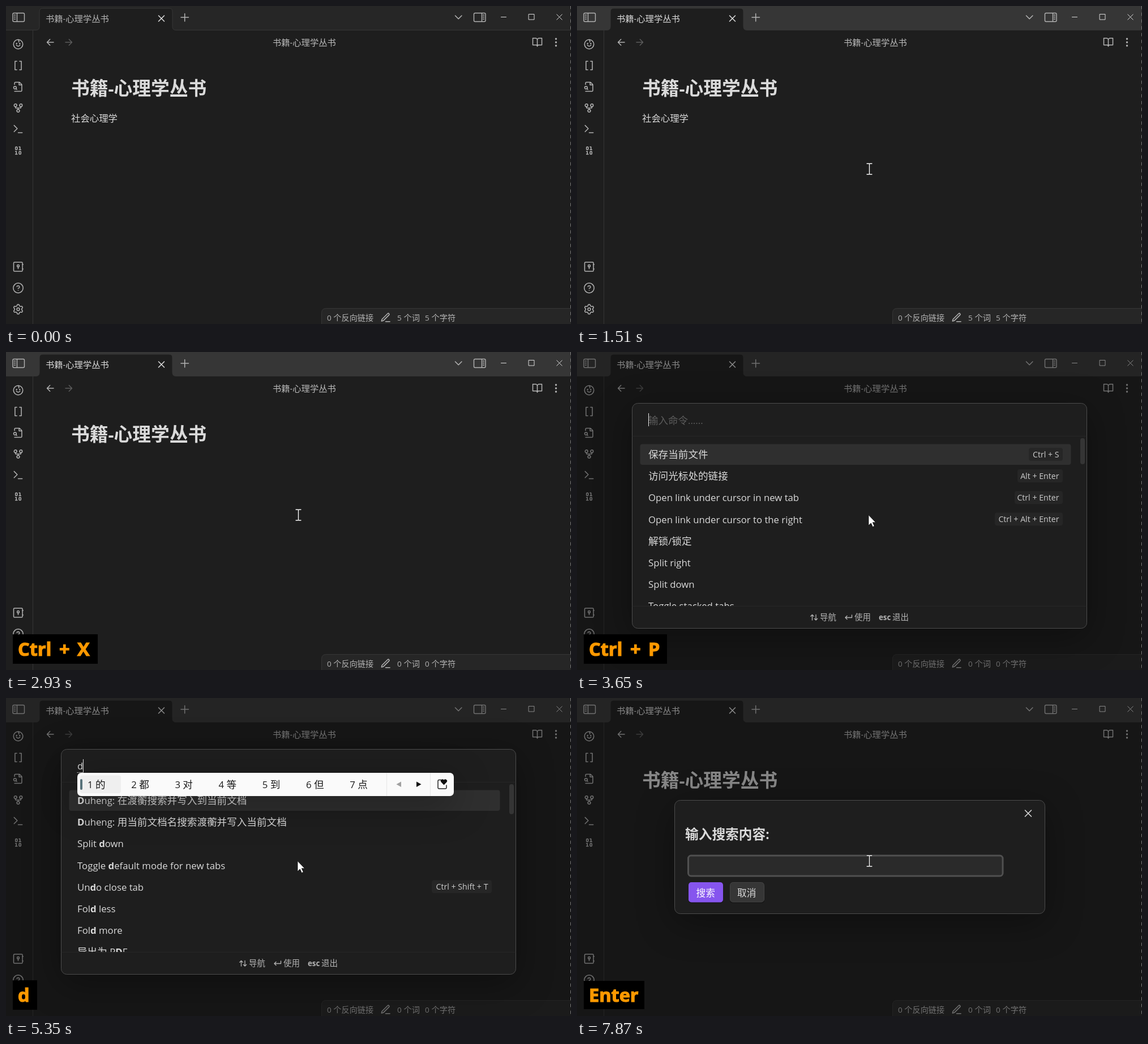
Recreate the animation shown at these times as an HTML page. Size 998 by 561 pixels, loop 8000 ms.

```html
<!DOCTYPE html>
<html lang="zh-CN">
<head>
<meta charset="utf-8">
<title>Command palette</title>
<style>
html, body { margin: 0; width: 100%; height: 100%; overflow: hidden; background: #1e1e1e; }
svg { display: block; width: 100vw; height: 100vh; }
text { font-family: "Open Sans", "Noto Sans CJK SC", "Noto Sans CJK", sans-serif; white-space: pre; }
.panel { filter: drop-shadow(0 15px 32px rgba(0, 0, 0, .35)); }
</style>
</head>
<body>
<svg id="stage" viewBox="0 0 998 561" xmlns="http://www.w3.org/2000/svg"></svg>
<script>
const LOOP = 8000;
const MUTED = '#b3b3b3', BRIGHT = '#dadada', LINE = '#363636', BASE = '#1e1e1e';
const LATIN = 0.952; // latin glyphs are set a little smaller than the CJK ones

const box = (x, y, w, h, fill, r = 0, more = '') =>
  `<rect x="${x}" y="${y}" width="${w}" height="${h}" rx="${r}" fill="${fill}" ${more}/>`;
const line = (d, color = MUTED, w = 1.5, more = '') =>
  `<path d="${d}" fill="none" stroke="${color}" stroke-width="${w}" stroke-linecap="round" stroke-linejoin="round" ${more}/>`;
const group = (id, body, more = '') => `<g id="${id}" ${more}>${body}</g>`;

// Asterisks switch bold on and off.
function runs(str, size) {
  return str.split('*').map((part, i) =>
    part.split(/([\u3000-\u9fff]+)/).filter(Boolean).map(run => {
      const px = /[\u3000-\u9fff]/.test(run) ? size : size * LATIN;
      return `<tspan font-size="${px.toFixed(2)}"${i % 2 ? ' font-weight="700"' : ''}>${run}</tspan>`;
    }).join('')).join('');
}
const text = (x, y, size, fill, str, more = '') =>
  `<text x="${x}" y="${y}" fill="${fill}" ${more}>${runs(str, size)}</text>`;

// Icons live on a 24-unit grid centred at (x, y).
const icon = (x, y, d, extra = '', s = 0.8) =>
  `<g transform="translate(${x} ${y}) scale(${s}) translate(-12 -12)" fill="none" stroke="${MUTED}"
    stroke-width="1.9" stroke-linecap="round" stroke-linejoin="round"><path d="${d}"/>${extra}</g>`;
const ring = (x, y, r) => `<circle cx="${x}" cy="${y}" r="${r}"/>`;
const frame = (x, y, w, h, r) => `<rect x="${x}" y="${y}" width="${w}" height="${h}" rx="${r}"/>`;
const cross = (x, y, r, color, w) =>
  line(`M${x - r} ${y - r}l${2 * r} ${2 * r}m0 ${-2 * r}l${-2 * r} ${2 * r}`, color, w);

function gear() {
  let d = '';
  for (let i = 0; i < 96; i++) {
    const a = i / 96 * 2 * Math.PI;
    const r = 9.2 + 1.5 * Math.tanh(1.8 * Math.cos(6 * a));
    d += `${i ? 'L' : 'M'}${(12 + r * Math.sin(a)).toFixed(2)} ${(12 - r * Math.cos(a)).toFixed(2)}`;
  }
  return d + 'Z';
}

function sidePanel(x, divider, tick) {
  return line(`M${x + 2} 12.500h16.500q2 0 2 2v11q0 2-2 2h-16.500q-2 0-2-2v-11q0-2 2-2M${divider} 12.500v15` +
    `M${tick} 16h2m-2 3.500h2m-2 3.500h2`, MUTED, 1.4);
}

const ribbon = () => [
  icon(21.500, 67.500, 'M8 14q4 4.500 8 0M12 2.500q3 2 1 4.500', ring(12, 12, 10.300) +
    `<g fill="${MUTED}">${ring(8.500, 10.500, .7)}${ring(15.500, 10.500, .7)}</g>`),
  icon(21.500, 105, 'M9 2.500H5v19h4M15 2.500h4v19h-4'),
  icon(21.500, 142.500, 'M4 22h14a2 2 0 0 0 2-2V7l-5-5H6a2 2 0 0 0-2 2v3M14 2v6h6M9 18l-1.500-1.500', ring(5, 14, 3)),
  icon(21.500, 180, 'M18 9v2q0 1-1 1H7q-1 0-1-1V9M12 12v3', ring(12, 18, 3) + ring(6, 6, 3) + ring(18, 6, 3)),
  icon(21.500, 217, 'M3 18l7-7-7-7M12 20h9'),
  icon(21.500, 255, 'M6 20h4M14 10h4M6 14h2v6M14 4h2v6', frame(14, 14, 4, 6, 1.500) + frame(6, 4, 4, 6, 1.500)),
  icon(21.500, 460, 'M12 12.500v4M21.500 7h1.500M21.500 17h1.500', frame(2, 2, 19.500, 20, 2) + ring(12, 10, 2.300)),
  icon(21.500, 497.500, 'M9.100 9a3 3 0 0 1 5.800 1c0 2-3 3-3 3M12 17h.01', ring(12, 12, 10.800)),
  icon(21.500, 535, gear(), ring(12, 12, 3))
].join('');

const TAB = 'M-2 42.500H53q6 0 6-6V10q0-6 6-6H288q6 0 6 6V36.500q0 6 6 6H1000';
const NAME = '书籍-心理学丛书';

const app = () =>
  box(0, 0, 998, 561, BASE) +
  box(0, 0, 998, 42, '#262626', 0, 'id="bar"') +
  `<path d="${TAB}V46H-2Z" fill="${BASE}"/>` + line(TAB, LINE, 1) +
  line('M47.500 43V561', LINE, 1) +
  sidePanel(12, 19.500, 14.500) + sidePanel(826.500, 840.500, 842.500) +
  text(70, 28, 15.300, MUTED, NAME, 'id="tabName"') +
  cross(274.500, 22, 5, BRIGHT, 1.6) +
  line('M309 20h13.500M315.700 13.500v13.500', MUTED, 1.5) +
  line('M793.500 17l5.700 5.700 5.700-5.700', MUTED, 1.6) +
  line('M874.500 19.500h9M923.500 14.500h9.500v9.500h-9.500z', BRIGHT, 1) + cross(977.500, 19.500, 4.700, BRIGHT, 1) +
  line('M84 64H72.500m5.200-5.200L72.500 64l5.200 5.200', MUTED) +
  line('M105 64h11.500m-5.200-5.200l5.200 5.200-5.200 5.200', '#5c5c5c') +
  text(471, 69.500, 15.300, '#b8b8b8', NAME) +
  icon(938.500, 64, 'M12 7v14M2 18V3h6a4 4 0 0 1 4 4 4 4 0 0 1 4-4h6v15h-7a3 3 0 0 0-3 3 3 3 0 0 0-3-3z') +
  [58, 64, 70].map(y => `<circle cx="971.500" cy="${y}" r="1.700" fill="${MUTED}"/>`).join('') +
  ribbon() +
  text(115, 157, 32.750, BRIGHT, NAME, 'font-weight="700"') +
  box(115, 185, 82, 22, '#423265', 0, 'id="selection"') +
  text(115, 203.500, 16.400, BRIGHT, '社会心理学', 'id="body"') +
  `<path d="M557.500 562V541.500q0-8 8-8H1000V562Z" fill="#262626" stroke="${LINE}"/>` +
  text(567, 555, 14.200, MUTED, '0 个反向链接') +
  icon(670.500, 549.500, 'M12 21h9.500M16.500 3.500a2.100 2.100 0 0 1 3 3L7 19l-4 1 1-4z') +
  text(691, 555, 14.200, MUTED, '5', 'id="words"') + text(702.500, 555, 14.200, MUTED, '个词') +
  text(740, 555, 14.200, MUTED, '5', 'id="chars"') + text(751.500, 555, 14.200, MUTED, '个字符');

const row = i => 187.300 + 38.080 * i;
const hotkey = (i, x, label) =>
  box(x, row(i) - 18.300, 858 - x, 23, '#262626', 4) +
  text(851.500, row(i) - 1.300, 14.900, '#cccccc', label, 'text-anchor="end"');
const list = items => items.map((s, i) => text(126, row(i), 17.600, BRIGHT, s)).join('');

const ALL = ['保存当前文件', '访问光标处的链接', 'Open link under cursor in new tab',
  'Open link under cursor to the right', '解锁/锁定', 'Split right', 'Split down', 'Toggle stacked tabs'];
const FOUND = ['*D*uheng: 在渡蘅搜索并写入到当前文档', '*D*uheng: 用当前文档名搜索渡蘅并写入当前文档',
  'Split *d*own', 'Toggle *d*efault mode for new tabs', 'Un*d*o close tab', 'Fol*d* less', 'Fol*d* more', '导出为 P*D*F'];

const palette = () =>
  box(97.500, 90.500, 803, 397, BASE, 10, 'stroke="#4c4c4c" class="panel"') +
  line('M98 148.500H900M98 448.500H900', '#272727', 1) +
  text(126, 126.500, 17.500, '#5c5c5c', '输入命令......', 'id="hint"') +
  text(126, 126, 17.600, BRIGHT, 'd', 'id="typed"') +
  box(111.500, 162.500, 761, 36.500, '#2f2f2f', 4) +
  box(889, 152, 8, 46, '#353535', 4, 'id="thumb"') +
  '<clipPath id="listArea"><path d="M98 149H900V448H98Z"/></clipPath><g clip-path="url(#listArea)">' +
  group('all', list(ALL) + hotkey(0, 798, 'Ctrl + S') + hotkey(1, 778, 'Alt + Enter') +
    hotkey(2, 773, 'Ctrl + Enter') + hotkey(3, 738, 'Ctrl + Alt + Enter')) +
  group('found', list(FOUND) + hotkey(4, 752, 'Ctrl + Shift + T')) + '</g>' +
  line('M415.500 473v-9.500m-2.700 2.700l2.700-2.700 2.700 2.700M422 463.500v9.500m-2.700-2.700l2.700 2.700 2.700-2.700', MUTED, 1.3) +
  line('M485.500 464v4.500h-11.500m3-3l-3 3 3 3', MUTED, 1.4) +
  text(429, 473, 14.500, MUTED, '导航') + text(490, 473, 14.500, MUTED, '使用') +
  text(533, 473, 14, MUTED, '*esc*') + text(557, 473, 14.500, MUTED, '退出');

const ime = () =>
  line('M126 131.500h10', BRIGHT, 1, 'stroke-dasharray="1 2"') +
  box(126, 132, 665, 41, '#fafafa', 7, 'class="panel"') +
  box(131, 136.500, 72, 31.500, '#efefef', 4) + box(131, 143, 4, 19, '#57727a', 2) +
  [...'的都对等到但点'].map((c, i) => text(144 + 77.200 * i, 159, 17.600, '#1c1c1c', `${i + 1} ${c}`)).join('') +
  line('M672.500 132.500v40M749.500 132.500v40', '#e6e6e6', 1) +
  '<path d="M698 147.500v9.500l-8.500-4.750z" fill="#a0a0a0"/><path d="M725 147.500v9.500l8.500-4.750z" fill="#111"/>' +
  line('M769 144.500h-4q-2 0-2 2v11.500q0 2 2 2h11q2 0 2-2v-4', '#222', 1.5) +
  '<path d="M773.500 153.500l-5-5.200a3 3 0 0 1 5-3.600a3 3 0 0 1 5 3.600z" fill="#111"/>';

const dialog = () =>
  box(172.500, 180.500, 654, 200, BASE, 10, 'stroke="#4c4c4c" class="panel"') +
  cross(797, 203.500, 5.500, BRIGHT, 1.6) +
  text(191, 248.500, 23.700, BRIGHT, '输入搜索内容:', 'font-weight="700"') +
  box(196.500, 278, 555.500, 36, '#2a2a2a', 5, 'stroke="#505050" stroke-width="3"') +
  box(197, 326, 61, 36, '#151515', 5) + box(270, 326, 61, 36, '#151515', 5) +
  box(197, 325, 61, 35.500, '#8655ee', 5) + box(270.500, 325.500, 60, 34.500, LINE, 5, 'stroke="#454545"') +
  text(210.500, 350, 16.700, '#fff', '搜索') + text(283, 350, 16.700, BRIGHT, '取消');

const beam = 'M-4.500-9.500h3.500q1 0 1 1q0-1 1-1h3.500M0-8.500v17M-4.500 9.500h3.500q1 0 1-1q0 1 1 1h3.500';

document.getElementById('stage').innerHTML =
  app() + box(0, 0, 998, 561, 'rgba(10,10,10,.4)', 0, 'id="dim"') +
  group('palette', palette()) + group('dialog', dialog()) +
  box(0, 0, 1, 22, '#e6e6e6', 0, 'id="caret"') +
  group('ime', ime()) +
  '<circle id="click" cx="514" cy="286.500" r="14" fill="#ff0" fill-opacity=".47"/>' +
  group('beam', line(beam, '#111', 2.6) + line(beam, '#fff', 1.4)) +
  '<path id="arrow" d="M515 287.500v18.500l4.300-4.100 3 6.600 3-1.300-3-6.500h5.400z" fill="#fff" stroke="#111" stroke-width=".8"/>' +
  group('cast', box(12, 498, 150, 52, '#000', 0, 'id="castBox"') +
    '<text id="castText" x="21" y="536" font-size="32.500" font-weight="700" fill="#ff9900" stroke="#ff9900" stroke-width="1.200" word-spacing="5"></text>') +
  line('M997.500 0V561', '#7a7a7a', 1, 'stroke-dasharray="5 7" stroke-linecap="butt"');

const el = {};
document.querySelectorAll('[id]').forEach(n => el[n.id] = n);
const show = (name, on) => el[name].setAttribute('opacity', +on);

// Key captions: start, label, box width.
const CASTS = [[0, '', 0], [1710, 'Ctrl + A', 149], [2430, 'Ctrl + A Ctrl + X', 297], [2830, 'Ctrl + X', 150],
  [3550, 'Ctrl + P', 147], [4850, '', 0], [5260, 'd', 43], [6470, '', 0], [7370, 'Enter', 107]];

// Carets: start, end, x, y, width, height.
const CARETS = [[910, 1510, 197, 185, 1, 22], [1710, 2210, 197, 185, 1, 22], [2430, 2930, 115, 185, 1, 22],
  [3550, 4250, 126, 108, 1, 23], [4750, 5260, 126, 108, 1, 23], [5260, 6470, 136, 108, 1, 23],
  [6970, 7370, 136, 108, 1, 23], [7370, 7870, 207, 286, 1.5, 21]];

function drawCast(t) {
  const [, label, w] = CASTS.filter(c => t >= c[0]).pop();
  const low = label === 'Enter';
  show('cast', label !== '');
  el.castText.textContent = label;
  el.castBox.setAttribute('width', w);
  el.castBox.setAttribute('y', low ? 499 : 498);
  el.castBox.setAttribute('height', low ? 50 : 52);
}

function drawCaret(t) {
  const c = CARETS.find(c => t >= c[0] && t < c[1]);
  show('caret', !!c);
  if (c) ['x', 'y', 'width', 'height'].forEach((k, i) => el.caret.setAttribute(k, c[i + 2]));
}

function drawMouse(t) {
  const step = Math.min(1, Math.floor((t - 310) / 100) / 5);
  const left = (1 - step) ** 2;
  const inPalette = t >= 3550 && t < 7370;
  show('beam', t >= 310 && !inPalette);
  show('arrow', inPalette);
  el.beam.setAttribute('transform', `translate(${516.500 + 150 * left} ${287.500 + 113 * left})`);
  show('click', t >= 910 && t < 1110);
}

function draw(t) {
  const focused = t >= 910, cut = t >= 2430, typed = t >= 5260, found = t >= 5350;
  el.bar.setAttribute('fill', focused ? LINE : '#262626');
  el.tabName.setAttribute('fill', focused ? BRIGHT : MUTED);
  show('selection', t >= 1710 && !cut);
  show('body', !cut);
  el.chars.firstChild.textContent = cut ? '0' : '5';
  el.words.firstChild.textContent = t >= 2630 ? '0' : '5';
  show('dim', t < 3550 ? 0 : t < 3650 ? .5 : 1);
  show('palette', t < 3550 || t >= 7370 ? 0 : t < 3650 ? .5 : 1);
  show('hint', !typed);
  show('typed', typed);
  show('all', !found);
  show('found', found);
  el.thumb.setAttribute('height', found ? 53 : 46);
  show('ime', found && t < 5860);
  show('dialog', t < 7370 ? 0 : t < 7470 ? .5 : 1);
  drawCaret(t);
  drawMouse(t);
  drawCast(t);
}

const start = performance.now();
function tick() {
  draw((performance.now() - start) % LOOP);
  requestAnimationFrame(tick);
}
tick();
</script>
</body>
</html>
```
